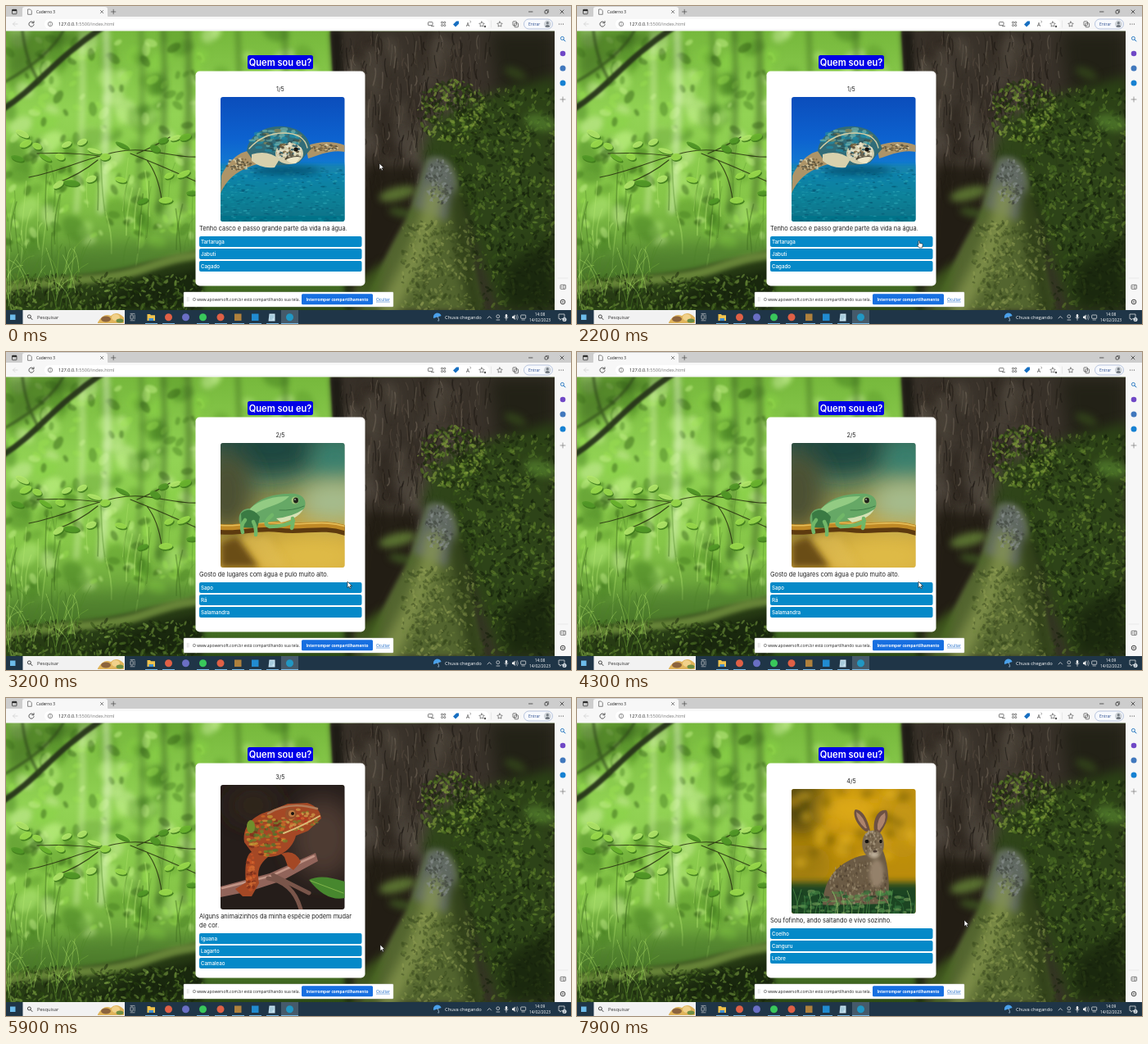
An HTML page with a canvas that plays this animation: 690x388 px, repeating every 8000 ms.

```html
<!DOCTYPE html>
<html lang="pt-BR">
<head>
<meta charset="utf-8">
<title>Quem sou eu?</title>
<style>
html, body { margin: 0; width: 100%; height: 100%; overflow: hidden; background: #f7f7f7; }
canvas, svg { position: absolute; left: 0; top: 0; width: 690px; height: 388px; }
.page { font-family: Inter, sans-serif; }
.ui { font-family: "Open Sans", sans-serif; }
</style>
</head>
<body>
<canvas id="forest" width="690" height="388"></canvas>
<svg id="stage" viewBox="0 0 690 388"></svg>
<script>
let seed = 11;
const rnd = () => {
  seed = (seed + 0x6D2B79F5) | 0;
  let k = Math.imul(seed ^ (seed >>> 15), 1 | seed);
  k = (k + Math.imul(k ^ (k >>> 7), 61 | k)) ^ k;
  return ((k ^ (k >>> 14)) >>> 0) / 4294967296;
};
const span = (a, b) => a + (b - a) * rnd();
const pick = list => list[Math.floor(rnd() * list.length)];
const inBox = (x, y, w, h) => () => [x + w * rnd(), y + h * rnd()];
const inOval = (cx, cy, rx, ry) => () => {
  const a = rnd() * 6.283, r = Math.sqrt(rnd());
  return [cx + rx * r * Math.cos(a), cy + ry * r * Math.sin(a)];
};

// ---------- forest backdrop ----------
function paintForest() {
  const g = document.getElementById('forest').getContext('2d');
  const set = (blur, alpha) => {
    g.filter = blur ? `blur(${blur}px)` : 'none';
    g.globalAlpha = alpha;
  };
  const oval = (x, y, rx, ry, color, turn = 0) => {
    g.fillStyle = color;
    g.beginPath();
    g.ellipse(x, y, rx, ry, turn, 0, 7);
    g.fill();
  };
  const fill = (d, color, blur = 0, alpha = 1) => {
    set(blur, alpha);
    g.fillStyle = color;
    g.fill(new Path2D(d));
  };
  const stroke = (d, color, width, blur = 0, alpha = 1) => {
    set(blur, alpha);
    g.strokeStyle = color;
    g.lineWidth = width;
    g.lineCap = 'round';
    g.stroke(new Path2D(d));
  };
  const dabs = (n, place, colors, rx, ry, blur, alpha, turn = 3) => {
    set(blur, alpha);
    for (let i = 0; i < n; i++) {
      const [x, y] = place(), s = span(.5, 1.3);
      oval(x, y, rx * s, ry * s, pick(colors), span(-turn, turn));
    }
  };

  const base = g.createLinearGradient(0, 30, 0, 371);
  [[0, '#76b83c'], [.3, '#92d354'], [.6, '#86c648'], [.8, '#639a37'], [1, '#2c4a14']]
    .forEach(([at, c]) => base.addColorStop(at, c));
  g.fillStyle = base;
  g.fillRect(0, 0, 690, 388);

  dabs(130, inBox(0, 30, 400, 260), ['#bcef80', '#5c9a2b', '#8bd445', '#417a1e', '#d6f4a8'], 15, 10, 3, .45);
  dabs(150, inBox(0, 40, 240, 250), ['#c9f58e', '#9ce050', '#487f22', '#315e15'], 7, 4, 1.2, .45);
  [[122, 9, '#e6f7cc'], [92, 6, '#dbf5b2'], [165, 5, '#46702a'], [192, 6, '#355720'],
   [222, 8, '#3a5a22'], [283, 5, '#39601c'], [340, 7, '#426f23']].forEach(([x, w, c]) =>
    stroke(`M${x} 30Q${x + 5} 120 ${x - 6} 250`, c, w, 3, .5));
  fill('M0 30H120L70 50L30 80L0 98Z', '#2f5217', 7, .55);
  stroke('M-4 126C40 98 55 68 118 26', '#26331a', 7, 1.2, .95);
  stroke('M40 92Q24 66 20 30M0 92Q55 60 70 30', '#2f481b', 3, 1.5, .75);
  for (let i = 0; i < 45; i++) {
    const x = span(0, 240), y = span(230, 330);
    stroke(`M${x} ${y}q${span(-6, 6)} -25 ${span(-8, 8)} ${span(-75, -30)}`,
      pick(['#376119', '#b3e670', '#558c2b']), span(.8, 2), 0, .4);
  }

  // undergrowth and fallen log
  fill('M0 308Q110 285 240 290V371H0Z', '#48762a', 8, .55);
  fill('M0 337C60 328 110 330 160 316S210 306 240 296V371H0Z', '#263915', 2, .95);
  stroke('M0 344C70 332 120 338 170 320S220 308 240 302', '#7c9d45', 11, 2.5, .75);
  fill('M90 371L155 338L240 318V371Z', '#17240d', 5, .8);
  dabs(420, inBox(0, 328, 240, 43), ['#587b29', '#15220a', '#82a845', '#2b4712'], 3.5, 1.4, 0, .5);
  for (let i = 0; i < 46; i++) {
    const x = span(-5, 90), y = span(320, 371), lean = span(-22, 26);
    stroke(`M${x} ${y}q${lean * .2} -25 ${lean} ${span(-55, -25)}`, pick(['#78b03a', '#4f8426', '#b0e068']), .9, 0, .5);
  }

  // twigs and leaves
  stroke('M28 209C70 201 95 186 135 178S200 186 236 184M152 180Q190 195 232 214M62 216Q90 206 112 188M160 180Q180 172 200 160M38 180Q82 178 120 184M172 188Q186 206 190 236', '#27300f', 1.2, 0, .85);
  const leafTone = ['#9bdc4c', '#6ab52e', '#b2e76a', '#529827'];
  [[20, 156], [24, 168], [48, 185], [66, 184], [74, 169], [38, 171], [93, 166], [108, 177],
   [80, 216], [64, 218], [104, 211], [121, 184], [142, 170], [192, 164], [207, 161], [219, 160],
   [182, 174], [167, 238], [195, 237], [217, 205], [199, 207], [227, 228], [140, 212], [14, 186]]
    .forEach(([x, y]) => {
      set(.4, .9);
      const turn = span(-.6, .6), rx = span(6, 11), ry = span(2.5, 4.5);
      oval(x + 1, y + 1.6, rx, ry, '#3f7a1c', turn);
      oval(x, y, rx, ry, pick(leafTone), turn);
    });

  // trunk
  fill('M396 30H672V371H425C412 290 404 160 396 30Z', '#39322a', 1);
  dabs(60, inBox(420, 40, 130, 170), ['#655c51', '#514940', '#282119'], 9, 24, 6, .4, .2);
  for (let i = 0; i < 420; i++) {
    const [x, y] = inBox(402, 30, 190, 200)();
    stroke(`M${x} ${y}q${span(-4, 4)} 6 ${span(-3, 3)} ${span(6, 26)}`,
      pick(['#1d1812', '#746a5c', '#574c3f', '#15110d', '#443b30']), span(.5, 1.8), 0, .5);
  }
  fill('M396 30H410L425 371H415Z', '#17160f', 3, .8);
  fill('M590 30H672V130L600 110Z', '#1b1c10', 10, .75);
  fill('M440 195H505L492 260L450 340H425Z', '#1f1a11', 6, .85);

  // moss and root
  fill('M672 85L590 108L520 140L508 185L560 260L600 371H672Z', '#2d4517', 7, .9);
  dabs(1100, inBox(545, 100, 126, 271), ['#53772a', '#385618', '#16230b', '#6c8c30', '#101a07'], 3.2, 1.5, 0, .5);
  dabs(340, inOval(545, 128, 44, 38), ['#5a7d26', '#83a03c', '#2a3d14', '#1c2a0e'], 3, 1.5, 0, .6);
  fill('M514 188C535 178 550 194 552 222C562 265 572 318 584 371H435C450 330 468 296 490 257Z', '#53652f', 2.5);
  fill('M514 188C532 176 550 194 550 222L538 262L498 245Z', '#626a68', 4, .9);
  stroke('M522 230C515 290 490 325 466 371', '#8b9b51', 22, 7, .75);
  stroke('M553 235C556 290 566 330 575 371', '#233212', 20, 7, .75);
  dabs(420, inBox(484, 262, 88, 109), ['#74883f', '#37491c', '#98a658', '#2c3d16'], 3, 1.5, 0, .4);
  dabs(110, inOval(529, 215, 16, 28), ['#8a918f', '#3a3d38', '#6c716d'], 2.4, 1.4, 0, .5);
  fill('M425 340L462 310L450 371H425Z', '#47681f', 5, .7);
  fill('M604 320L672 280V371H610Z', '#141f0b', 9, .75);

  // out-of-focus leaves in front
  set(4, .6);
  oval(478, 229, 23, 8, '#7faa45', -.25);
  oval(482, 252, 15, 5, '#4f772a', .2);
  oval(653, 142, 20, 10, '#5d8c32', .25);
  oval(622, 82, 14, 6, '#3c581e', .4);
}
paintForest();

// ---------- svg helpers ----------
const rect = (x, y, w, h, fill, r = 0, more = '') =>
  `<rect x="${x}" y="${y}" width="${w}" height="${h}" rx="${r}" fill="${fill}" ${more}/>`;
const dot = (x, y, r, fill, more = '') => `<circle cx="${x}" cy="${y}" r="${r}" fill="${fill}" ${more}/>`;
const oval = (x, y, rx, ry, fill, more = '') =>
  `<ellipse cx="${x}" cy="${y}" rx="${rx}" ry="${ry}" fill="${fill}" ${more}/>`;
const shape = (d, fill, more = '') => `<path d="${d}" fill="${fill}" ${more}/>`;
const line = (d, color, w, more = '') =>
  `<path d="${d}" fill="none" stroke="${color}" stroke-width="${w}" stroke-linecap="round" ${more}/>`;
const text = (x, y, s, size, fill, more = '') =>
  `<text x="${x}" y="${y}" font-size="${size}" fill="${fill}" ${more}>${s}</text>`;
const mid = 'text-anchor="middle"';
const blur = n => `filter="url(#blur${n})"`;
const ramp = (id, stops, dir = 'x2="0" y2="1"') => `<linearGradient id="${id}" ${dir}>${stops.map((c, i) =>
  `<stop offset="${i / (stops.length - 1)}" stop-color="${c}"/>`).join('')}</linearGradient>`;
const specks = (n, place, colors, w, h, alpha = .6) => Array.from({ length: n }, () => {
  const [x, y] = place().map(v => v.toFixed(1));
  return oval(x, y, span(.5, 1) * w, span(.5, 1) * h, pick(colors), `opacity="${alpha}"`);
}).join('');

// ---------- pictures, 152 x 152 ----------
const turtle = () =>
  rect(0, 0, 152, 152, 'url(#sea)') +
  rect(-10, 82, 172, 80, 'url(#floor)', 0, blur(2)) +
  specks(420, inBox(0, 86, 152, 66), ['#3bb3c0', '#04506e', '#1592a6', '#076a86'], 3, .9, .5) +
  oval(80, 90, 42, 5, '#04506e', blur(4)) +
  shape('M34 66C22 67 8 80 1 96L0 118C7 101 20 89 45 82Z', '#ad9468') +
  shape('M104 60C122 53 139 54 152 59V67C134 64 121 71 107 75Z', '#ad9468') +
  specks(75, inOval(22, 82, 15, 7), ['#4b4a3b', '#75613d', '#e3d7ad'], 2, 1.4, .75) +
  specks(65, inOval(126, 62, 20, 4), ['#4b4a3b', '#75613d', '#e3d7ad'], 2, 1.2, .75) +
  shape('M32 66C34 46 55 34 78 36C98 38 109 50 110 64L96 80Q65 88 40 78Z', '#326c78') +
  specks(85, inOval(70, 53, 32, 14), ['#208ba5', '#74b1aa', '#284a50', '#8f8855'], 5, 2.5, .7) +
  line('M35 63Q52 44 77 44T106 62', '#d5cfa5', 1.3) +
  shape('M38 70Q58 64 72 76L66 86Q50 88 38 78Z', '#d8d1ad') +
  oval(84, 69, 17, 13, '#d4cfae') +
  specks(80, inOval(83, 66, 15, 10), ['#514b3b', '#275666', '#75613d', '#efe9d1'], 2.4, 1.8, .85) +
  oval(92, 64, 2.6, 2.5, '#14130f') + shape('M80 76Q89 71 98 72L92 81Q84 82 80 76Z', '#ede6c7') +
  line('M79 76Q90 71 98 73', '#39372c', .9);

const frog = () =>
  rect(0, 0, 152, 152, 'url(#dusk)') +
  oval(62, 8, 55, 30, '#1f463f', blur(14)) + oval(8, 60, 32, 50, '#4c5030', blur(14)) +
  oval(140, 18, 30, 24, '#35806f', blur(14)) + oval(138, 72, 44, 28, '#a5bc8e', blur(14)) +
  oval(112, 138, 60, 26, '#dfbb46', blur(14)) +
  shape('M0 122L20 114L48 152H0Z', '#6b4d12', blur(4)) +
  shape('M24 114L52 152H82L58 114Z', '#e0be55', `opacity=".6" ${blur(4)}`) +
  line('M-4 105C25 109 42 99 72 103S125 97 156 108', '#5d3a0f', 12) +
  line('M-4 102C25 106 42 96 72 100S125 94 156 105', '#c08a26', 7) +
  line('M-4 100C25 104 42 94 72 98S125 92 156 103', '#e5bd57', 1.6) +
  shape('M26 103C18 90 25 79 37 80C45 68 65 62 82 62C98 60 106 68 103 78C98 88 83 92 72 95L44 98Z', '#66a866') +
  shape('M36 80C48 69 65 65 84 65C74 76 55 77 39 88Z', '#93cb83') +
  shape('M68 92Q88 90 101 81Q94 93 74 97Z', '#d6e2b4') +
  shape('M25 86Q37 76 48 90L45 104L26 103Z', '#3a7a43') +
  line('M63 88Q50 99 60 102Q80 102 89 95M30 94Q24 101 27 109M40 96Q44 104 43 112M88 92Q89 99 87 104', '#71b768', 4.5) +
  line('M72 82Q88 83 102 77', '#36713f', .8) +
  dot(91, 70, 4.6, '#a2c67a') + oval(92, 70, 3, 3.4, '#20231a') + dot(91, 69, .8, '#eee');

const lizard = () =>
  rect(0, 0, 152, 152, '#251d1a') +
  oval(125, 65, 40, 50, '#4d3b31', blur(14)) + oval(40, 25, 30, 20, '#30261f', blur(14)) +
  shape('M0 124L60 108L116 83L119 93L75 117L35 130L0 137Z', '#91645a') +
  line('M2 126L62 111L114 87', '#c39687', 2.5) +
  line('M58 114Q89 119 98 152M64 110L108 132', '#79554a', 5) +
  shape('M108 116Q122 108 152 118V138Q129 143 108 116Z', '#47872e') + line('M110 117L150 132', '#80b54b', 1) +
  shape('M29 70C26 48 43 36 60 32L82 23L106 22C119 26 122 34 123 41L107 56L92 62C88 78 74 88 58 88C48 96 44 104 47 120L38 136H27L18 127L31 119C29 98 32 84 38 82Z', '#a44825') +
  shape('M74 84Q91 78 98 94L89 104L82 99L78 88Z', '#a44825') +
  specks(110, inOval(56, 62, 25, 24), ['#d06d27', '#70822b', '#7a2d1b', '#c39c36', '#55742c'], 3.6, 2.3, .75) +
  specks(65, inOval(97, 43, 21, 13), ['#d46c32', '#71832d', '#b92f20', '#d1a24b'], 3, 2, .7) +
  specks(45, inOval(37, 106, 5, 25), ['#d46c32', '#7b2e1b', '#c45125'], 2.8, 2.3, .75) +
  oval(37, 51, 5, 8, '#708e2c') + line('M58 35Q84 19 118 29', '#b07b58', 2.5) +
  line('M77 59Q98 51 121 38', '#d9bd79', 2) +
  dot(86, 35, 7, '#96512c') + dot(87, 35, 4, '#c27d45') + dot(88, 35, 2, '#17110d');

const rabbit = () =>
  rect(0, 0, 152, 152, '#bb8c0b') +
  oval(12, 18, 30, 38, '#453d0b', blur(14)) + oval(72, 25, 45, 23, '#dfab14', blur(14)) +
  oval(136, 40, 22, 40, '#c69914', blur(14)) + oval(14, 92, 35, 24, '#9b7a0f', blur(14)) +
  `<g ${blur(4)}>` + specks(32, inBox(0, 0, 152, 95), ['#f1c227', '#6b5509', '#d9a212'], 10, 8, .5) + '</g>' +
  rect(-10, 114, 172, 50, '#1c4524', 0, blur(4)) +
  shape('M38 142C38 113 54 91 83 82L112 76C119 94 120 121 118 140Z', '#6b5b45') +
  shape('M91 52C78 44 74 28 78 25C88 25 94 41 96 51ZM101 51C99 37 106 24 116 26C121 35 112 49 107 55Z', '#6d5143') +
  shape('M90 48Q79 38 79 28Q88 33 92 48ZM105 49Q104 35 114 29Q117 39 107 51Z', '#ad846c') +
  shape('M87 61C90 48 107 47 111 58C116 72 110 84 101 85C91 84 84 75 87 61Z', '#796850') +
  specks(260, inOval(81, 114, 36, 27), ['#8e7e62', '#4a3d2e', '#a5967b', '#67563f'], 1.3, 2.3, .6) +
  specks(80, inOval(99, 66, 11, 16), ['#9c8b70', '#5b4b38', '#b3a48b'], 1.2, 1.8, .6) +
  oval(104, 103, 9, 17, '#94816a', blur(2)) + oval(101, 80, 6, 4, '#c3b5a0', blur(2)) +
  dot(92, 64, 2.3, '#15120e') + oval(109, 64, 1.7, 2.3, '#15120e') + oval(102, 76, 2.6, 1.6, '#493a31') +
  specks(120, inBox(0, 125, 152, 27), ['#2e6b37', '#163b20', '#4d8b47', '#76a05a'], 5, 2.4, .6) +
  Array.from({ length: 30 }, () => {
    const x = span(0, 152);
    return line(`M${x} 152q2 -13 ${span(-9, 9)} ${span(-34, -12)}`, pick(['#4c8c48', '#2c6b37', '#84ae62']), 1, 'opacity=".75"');
  }).join('');

// ---------- quiz ----------
const slides = [
  { from: 0, art: turtle, ask: ['Tenho casco e passo grande parte da vida na água.'], options: ['Tartaruga', 'Jabuti', 'Cagado'] },
  { from: 2400, art: frog, ask: ['Gosto de lugares com água e pulo muito alto.'], options: ['Sapo', 'Rã', 'Salamandra'] },
  { from: 4700, art: lizard, ask: ['Alguns animaizinhos da minha espécie podem mudar', 'de cor.'], options: ['Iguana', 'Lagarto', 'Camaleao'] },
  { from: 7300, art: rabbit, ask: ['Sou fofinho, ando saltando e vivo sozinho.'], options: ['Coelho', 'Canguru', 'Lebre'] }
];
slides.forEach(s => {
  const tall = s.ask.length > 1;
  s.lift = tall ? -5 : 0;
  s.top = tall ? 287 : 281;
});
const slide = (s, i) => `<g class="slide page">` +
  text(335, 104 + s.lift, `${i + 1}/5`, 7.2, '#222', mid) +
  `<g transform="translate(262 ${111 + s.lift})" clip-path="url(#frame)">${s.art()}</g>` +
  s.ask.map((q, k) => text(236, 273.8 + s.lift + k * 10.7, q, 7.4, '#222')).join('') +
  s.options.map((o, k) => rect(236, s.top + k * 15, 198.5, 13, '#0589c8', 2) +
    text(238, s.top + 8.5 + k * 15, o, 6.2, '#fff', 'font-weight="500"')).join('') + '</g>';

// ---------- browser and desktop ----------
const lens = (x, y, c) => `<circle cx="${x - .6}" cy="${y - .6}" r="2" fill="none" stroke="${c}" stroke-width=".9"/>` +
  line(`M${x + 1} ${y + 1}l2 2`, c, 1);
const ring = (x, y, r, c, w = .7) => dot(x, y, r, 'none', `stroke="${c}" stroke-width="${w}"`);
const box = (x, y, w, h, c) => rect(x, y, w, h, 'none', .7, `stroke="${c}" stroke-width=".7"`);
const star = (x, y) => line(`M${x} ${y - 3}l1 2 2.2.3-1.6 1.6.4 2.2-2-1-2 1 .4-2.2-1.6-1.6 2.2-.3z`, '#444', .6);

const browser = () => `<g class="ui">` +
  rect(0, 0, 690, 14, '#cdcdcd') + shape('M18 14Q20 14 20 11V4Q20 1 23 1H121Q124 1 124 4V11Q124 14 126 14Z', '#f7f7f7') +
  rect(0, 13, 690, 17.5, '#f7f7f7') + rect(670, 30, 20, 341, '#f7f7f7') +
  box(7.5, 4.3, 5.5, 5.5, '#222') + rect(7.5, 4.3, 5.5, 1.8, '#222') +
  line('M27 4h2.5l1.8 1.8V10.3H27z', '#555', .7) + text(37, 9, 'Caderno 3', 4.8, '#222') +
  line('M115.4 5.4l3.4 3.4m0-3.4l-3.4 3.4', '#333', .6) + line('M128.5 7h5.4M131.2 4.3v5.4', '#333', .6) +
  line('M638.5 7h4.5M677 5l4 4m0-4l-4 4', '#222', .7) + box(658, 5.6, 3.5, 3.5, '#222') + line('M659.4 4.6h3.2v3.2', '#222', .5) +
  line('M14 22H8.5l2.4-2.4M8.5 22l2.4 2.4', '#d0d0d0', .8) +
  line('M33.6 20.3A3.1 3.1 0 1 0 34.1 22.7M34 18.6v2.2h-2.2', '#333', .8) +
  rect(47, 16, 543, 12, '#fff', 6) + ring(54, 22, 2.7, '#666') + line('M54 21.7v1.6M54 20.5v.1', '#666', .6) +
  text(64, 24, '127.0.0.1<tspan fill="#777">:5500/index.html</tspan>', 5.65, '#222') +
  box(515.5, 19.6, 5.5, 4, '#444') + line('M519.5 24.7h3', '#444', .7) +
  [531.5, 534.7].map(x => box(x, 19.2, 2, 2, '#444') + box(x, 22.6, 2, 2, '#444')).join('') +
  shape('M546 22.5L550 18.5H553V21.8L549 25.6Z', '#176fc1') +
  text(562, 24.5, 'A', 6.4, '#444') + line('M567 18q1.5 1.2 0 2.4', '#444', .5) +
  star(581, 22) + star(603, 22) + line('M592.5 18v8', '#ddd', .6) +
  box(619, 18.8, 4.5, 5, '#444') + box(621, 20.8, 4.5, 5, '#444') + dot(585, 25, 1.2, '#555') +
  rect(632.5, 16, 35, 12, '#f7f9fd', 6, 'stroke="#8ea3cc" stroke-width=".6"') + text(638, 24, 'Entrar', 5, '#2d4f91') +
  dot(661.3, 22, 4.4, '#cfd4d9') + dot(661.3, 20.7, 1.6, '#747b83') + shape('M658.2 25.2Q661.3 20.5 664.4 25.2Q661.3 27 658.2 25.2Z', '#747b83') +
  [675.5, 678, 680.5].map(x => dot(x, 22, .6, '#333')).join('') +
  lens(680, 40, '#1b70be') + dot(680, 58, 3.3, '#7048c6') + dot(680, 76, 3.5, '#4178bd') + dot(680, 94, 3.5, '#1681d2') +
  line('M677 114h6M680 111v6', '#777', .7) + line('M674 332h12', '#ddd', .6) +
  box(677, 340.3, 6.5, 5, '#444') + line('M681.3 340.5v4.6M678 342.8h2', '#444', .6) +
  ring(680, 361, 2.8, '#444', 1) + ring(680, 361, .9, '#444', .6) + '</g>';

const shareBar = () => `<g class="ui">` +
  rect(217, 349, 256, 18, '#fff', 1, 'stroke="#ccc" stroke-width=".4"') +
  line('M221.3 355.5v4.6M223 355.5v4.6', '#bbb', .6, 'stroke-dasharray=".7 1.2"') +
  text(228, 359.8, 'O www.apowersoft.com.br está compartilhando sua tela.', 4.95, '#222') +
  rect(361, 351.3, 87, 13, '#176fe0', 1.5) +
  text(404.5, 359.6, 'Interromper compartilhamento', 4.8, '#fff', mid + ' font-weight="700"') +
  text(452, 359.8, 'Ocultar', 4.9, '#1a68c7', 'text-decoration="underline"') + '</g>';

const taskbar = () => `<g class="ui">` +
  rect(0, 371, 690, 17, '#1f3547') + rect(5, 376.5, 6.5, 6.5, '#6dbbea') +
  rect(20.5, 371, 124.5, 17, '#f2f2f2') + lens(29, 379.5, '#333') + text(38, 381.8, 'Pesquisar', 5.8, '#333') +
  shape('M112 386Q119 374 128 378Q135 371 144 380V387H112Z', '#e0b45a') + oval(122, 382, 6, 3.5, '#8b633d') +
  oval(134, 380, 5, 4, '#f1d18a') + oval(139, 384, 4.5, 2.5, '#6d8d43') +
  box(152, 377, 3.2, 5, '#ddd') + line('M157.2 377v5M152 375.4h5M152 383.8h5', '#ddd', .6) +
  shape('M172.5 376h3.5l1 1.2h5v6.8h-9.5z', '#f1c34d') + rect(174.5, 381, 5.5, 3, '#418ed1') +
  dot(198.5, 379.8, 4.5, '#df6046') + dot(219.5, 379.8, 4.5, '#6a6fc4') +
  dot(240.5, 379.8, 4.5, '#39c75b') + dot(262, 379.8, 4.5, '#df6046') +
  rect(279, 375.5, 8.5, 8.5, '#af813d') + rect(300, 375.5, 8.5, 8.5, '#218bd0') +
  shape('M321.5 375.5h7v9h-8z', '#c7e2ef') + line('M322.5 378h4.5M322 380h4.5M322 382h3', '#5d96b0', .6) +
  rect(336, 371, 21, 17, '#455a6a') + dot(346.5, 379.8, 4.5, '#2197c3') +
  [170, 191, 233, 255, 276, 297, 318, 336].map(x => rect(x, 387, x === 336 ? 21 : 15, 1, '#77b9e6')).join('') +
  shape('M522 379.5A5 5 0 0 1 532 379.5Z', '#4aa0ea', 'transform="rotate(-18 527 380)"') + line('M527.3 379l1.6 4.6q-.4 1-1.5.4', '#b7d5ed', .7) +
  text(536, 381.8, 'Chuva chegando', 5.75, '#fff') +
  line('M588 381l2.3-2.4 2.3 2.4', '#eee', .7) +
  ring(600.8, 378.7, 1.9, '#eee') + line('M599 383h3.8', '#eee', .7) +
  rect(609.8, 376, 2.4, 4.6, '#eee', 1.2) + line('M608.8 380q2.2 3 4.4 0M611 381.5v2', '#eee', .6) +
  shape('M618 378.6h1.5l2-2v6.4l-2-2H618z', '#eee') + line('M623 377.6q1.5 2.2 0 4.4M624.4 376.6q2.2 3.2 0 6.4', '#eee', .5) +
  box(628.7, 377, 6, 4.3, '#eee') + line('M630 383h3.4', '#eee', .6) +
  text(652, 377.5, '14:08', 4.9, '#fff', mid + ' id="clock"') + text(652, 385.3, '14/02/2023', 4.9, '#fff', mid) +
  shape('M675 376h7v5.6h-3.6l-1.6 1.6v-1.6H675z', 'none', 'stroke="#eee" stroke-width=".7"') +
  dot(682, 382.5, 2.5, '#dce3e8') + text(682, 384, '2', 4, '#102235', mid) + '</g>';

const stage = document.getElementById('stage');
stage.innerHTML = '<defs>' +
  [2, 4, 14].map(n => `<filter id="blur${n}" x="-100%" y="-100%" width="300%" height="300%"><feGaussianBlur stdDeviation="${n}"/></filter>`).join('') +
  ramp('sea', ['#0b4dbb', '#0d62cf', '#1587d3', '#087795']) +
  ramp('floor', ['#1583b3', '#098299', '#056b80']) +
  ramp('dusk', ['#2a4f45', '#5f7f5c', '#b79c3f', '#d2a738'], 'x2=".15" y2="1"') +
  '<clipPath id="frame"><rect width="151.5" height="152" rx="3"/></clipPath></defs>' +
  browser() +
  rect(231.5, 79.5, 207, 262, '#fff', 5) +
  rect(295, 60, 80, 17, '#0000e6', 2.5) +
  text(335, 73, 'Quem sou eu?', 11.1, '#fff', mid + ' class="page" font-weight="600"') +
  slides.map(slide).join('') + shareBar() + taskbar() +
  `<g id="pointer" stroke="#111" stroke-width=".6" stroke-linejoin="round">` +
  shape('M0 0V7.6L1.8 6L3 8.8L4.3 8.2L3.1 5.6H5.5Z', '#fff', 'id="arrow"') +
  shape('M0 .8Q.8-.3 1.5.8V3.4L4.5 4Q5.4 4.3 5.2 5.4L4.6 9H1L-1.5 5.8Q-1.5 4.8 0 5.4Z', '#fff', 'id="hand"') + '</g>';

// ---------- motion ----------
const track = [ // ms, x, y
  [0, 456, 192], [200, 456, 192], [900, 355, 280], [1300, 337, 290], [1600, 342, 290],
  [2200, 417, 286], [2700, 417, 286], [3100, 417, 280], [4300, 417, 280], [4600, 414, 285],
  [5000, 414, 285], [5900, 457, 301], [6300, 430, 320], [6600, 405, 324], [7200, 405, 324],
  [7700, 470, 274], [7900, 473, 271]
];
const ease = u => u * u * (3 - 2 * u);
function pointerAt(t) {
  const i = track.findIndex(p => p[0] >= t);
  if (i < 1) return track[0].slice(1);
  const [t0, x0, y0] = track[i - 1], [t1, x1, y1] = track[i];
  const u = ease((t - t0) / (t1 - t0));
  return [x0 + (x1 - x0) * u, y0 + (y1 - y0) * u];
}
const byId = id => document.getElementById(id);
const groups = [...stage.querySelectorAll('.slide')];
const [pointer, arrow, hand, clock] = ['pointer', 'arrow', 'hand', 'clock'].map(byId);

function draw(t) {
  const now = slides.filter(s => s.from <= t).length - 1;
  groups.forEach((el, i) => { el.style.display = i === now ? '' : 'none'; });
  const [x, y] = pointerAt(t), row = y - slides[now].top;
  const over = x > 236 && x < 434 && row >= 0 && row < 43 && row % 15 < 13;
  pointer.setAttribute('transform', `translate(${x} ${y})`);
  arrow.style.display = over ? 'none' : '';
  hand.style.display = over ? '' : 'none';
  clock.textContent = t < 3500 ? '14:08' : '14:09';
}
const start = performance.now();
function tick() {
  draw(Math.floor((performance.now() - start) % 8000 / 100) * 100);
  requestAnimationFrame(tick);
}
tick();
</script>
</body>
</html>
```
